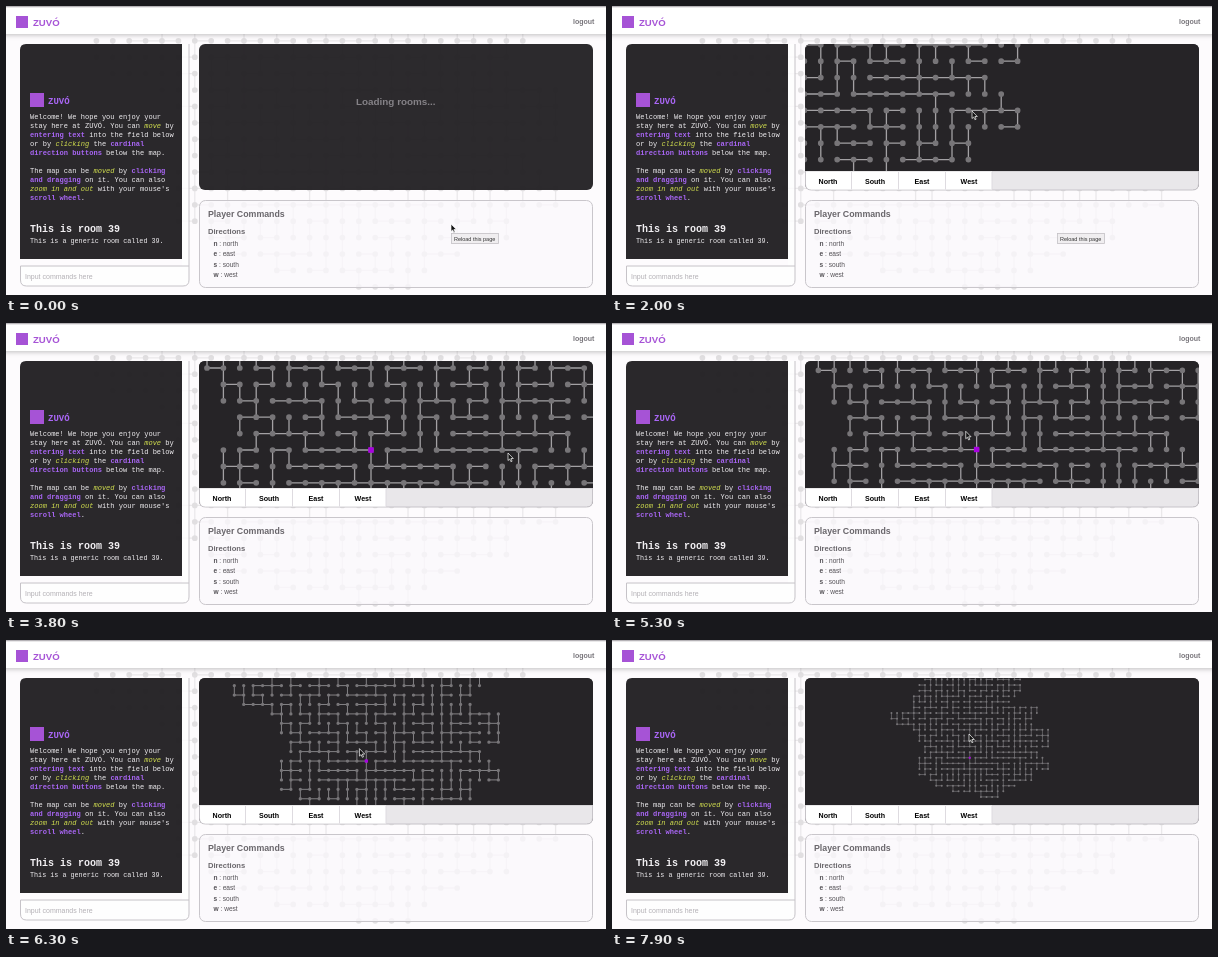
Animation, 600 px wide and 289 px high, one loop 8000 ms. Source, as an HTML page:

```html
<!DOCTYPE html>
<html lang="en">
<head>
<meta charset="utf-8">
<title>Room explorer</title>
<style>
  html, body { margin: 0; width: 100%; height: 100%; overflow: hidden; background: #fdfbfd; }
  svg { display: block; width: 600px; height: 289px; }
  text { font-family: "Liberation Sans", Arial, sans-serif; white-space: pre; }
  .b, b, .k { font-weight: bold; }
  .mono text { font-family: "Liberation Mono", "Courier New", monospace; font-size: 7.05px; fill: #f1eff2; }
  .mono .k { fill: #a966f5; }
  .mono .i { fill: #d3e04f; font-style: italic; }
  .soft { fill: #6a676c; }
</style>
</head>
<body>
<svg viewBox="0 0 600 289">
  <defs>
    <g id="rooms" fill="none">
      <path id="links" stroke="#a3a1a4" stroke-width=".08"/>
      <path id="nodes" stroke="#777578" stroke-width=".35" stroke-linecap="round"/>
    </g>
    <clipPath id="view"><path d="M193 165V44q0-6 6-6h382q6 0 6 6V165z"/></clipPath>
    <filter id="shade" x="-5%" y="-50%" width="110%" height="220%">
      <feDropShadow dx="0" dy="1" stdDeviation="2.5" flood-opacity=".25"/>
    </filter>
  </defs>

  <use href="#rooms" transform="translate(320 166) scale(16.4)" opacity=".2"/>

  <rect x="-10" y="-4" width="620" height="32" fill="#fff" filter="url(#shade)"/>
  <rect width="600" height="1.3" fill="#b5b2b6"/>
  <rect x="10" y="10" width="12" height="12" fill="#a653d6"/>
  <text class="b" x="27" y="20" font-size="9.6" fill="#a653d6">ZUVÓ</text>
  <text class="b" x="567" y="17.5" font-size="7" fill="#77747a">logout</text>

  <path d="M14.5 260V274q0 6 6 6H177q6 0 6-6V38H176V260z" fill="#fff" fill-opacity=".8"/>
  <path d="M183 38V274q0 6-6 6H20.500q-6 0-6-6V260H183" fill="none" stroke="#c6c3c8"/>
  <path d="M14 253V44q0-6 6-6H176V253z" fill="#262427" fill-opacity=".98"/>
  <text x="19" y="272.700" font-size="7" fill="#b3b0b5">Input commands here</text>
  <g class="mono">
    <rect x="24" y="87" width="14" height="14" fill="#a653d6"/>
    <text class="k" x="42" y="97.500" style="font-size:9px">ZUVÓ</text>
    <text x="24" y="113">Welcome! We hope you enjoy your</text>
    <text x="24" y="122">stay here at ZUVÓ. You can <tspan class="i">move</tspan> by</text>
    <text x="24" y="131"><tspan class="k">entering text</tspan> into the field below</text>
    <text x="24" y="140">or by <tspan class="i">clicking</tspan> the <tspan class="k">cardinal</tspan></text>
    <text x="24" y="149"><tspan class="k">direction buttons</tspan> below the map.</text>
    <text x="24" y="167">The map can be <tspan class="i">moved</tspan> by <tspan class="k">clicking</tspan></text>
    <text x="24" y="176"><tspan class="k">and dragging</tspan> on it. You can also</text>
    <text x="24" y="185"><tspan class="i">zoom in and out</tspan> with your mouse's</text>
    <text x="24" y="194"><tspan class="k">scroll wheel</tspan>.</text>
    <text class="b" x="24" y="226" style="font-size:10px">This is room 39</text>
    <text x="24" y="237" style="font-size:6.75px">This is a generic room called 39.</text>
  </g>

  <rect x="193" y="38" width="394" height="146" rx="6" fill="#262427" fill-opacity=".97"/>
  <text id="loading" class="b" x="350" y="99" font-size="9.9" fill="#858287">Loading rooms...</text>
  <g id="world">
    <path d="M193.500 165H586.500V178q0 6-6 6H199.500q-6 0-6-6z" fill="#e9e7ea" stroke="#c6c3c8"/>
    <path d="M194 165.500H380V183.500H199.500q-5.500 0-5.500-5.500z" fill="#fff"/>
    <path d="M239.500 166V183.500M286.500 166V183.500M333.500 166V183.500M380 166V183.500" stroke="#dedbe0"/>
    <g class="b" font-size="7.100" text-anchor="middle">
      <text x="216" y="177.500">North</text>
      <text x="263" y="177.500">South</text>
      <text x="310" y="177.500">East</text>
      <text x="357" y="177.500">West</text>
    </g>
    <g clip-path="url(#view)">
      <rect x="193" y="38" width="394" height="127" fill="#262427"/>
      <g id="map">
        <use href="#rooms"/>
        <rect x="-.17" y="-.17" width=".34" height=".34" fill="#a800e0"/>
      </g>
    </g>
  </g>

  <rect x="193.500" y="194.500" width="393" height="87" rx="6" fill="#fbf9fc" fill-opacity=".75" stroke="#c9c6cb"/>
  <g class="soft b">
    <text x="202" y="211" font-size="8.800">Player Commands</text>
    <text x="202" y="228" font-size="7.600">Directions</text>
  </g>
  <g font-size="6.600" fill="#555257">
    <text x="207.500" y="239.500"><tspan class="b">n</tspan> : north</text>
    <text x="207.500" y="250"><tspan class="b">e</tspan> : east</text>
    <text x="207.500" y="260.500"><tspan class="b">s</tspan> : south</text>
    <text x="207.500" y="271"><tspan class="b">w</tspan> : west</text>
  </g>

  <g id="tip">
    <rect x="445.500" y="227.500" width="47" height="10" fill="#f0eef0" stroke="#c4c1c5" stroke-width=".8"/>
    <text x="448" y="234.500" font-size="5.500" fill="#333">Reload this page</text>
  </g>
  <path id="cursor" d="M0 0V7.500L1.700 6 2.900 8.700 4.100 8.200 2.900 5.500H5.300z" fill="#111" stroke="#fff" stroke-width=".7"/>
</svg>

<script>
const $ = id => document.getElementById(id);

// West and east ends of each row of rooms, from north to south.
const TOP = -16;
const rows = [
  [-5, 7], [-7, 8], [-8, 9], [-9, 9], [-9, 9], [-10, 8], [-10, 7], [-10, 12],
  [-14, 12], [-14, 11], [-13, 11], [-10, 14], [-9, 14], [-9, 14], [-8, 14], [-8, 12],
  [-9, 13], [-9, 14], [-9, 14], [-9, 11], [-7, 11], [-6, 8], [-3, 6], [2, 5]
];

let seed = 39;
const random = () => (seed = seed * 16807 % 2147483647) / 2147483647;

// Grow a random tree of rooms outwards from the start room.
function buildRooms() {
  const seen = new Set(["0,0"]), open = [[0, 0]];
  let links = "", nodes = "M0 0h0";
  const free = ([x, y]) => {
    const row = rows[y - TOP];
    return row && x >= row[0] && x <= row[1] && !seen.has(x + "," + y);
  };
  const join = ([x, y], [u, v]) => {
    seen.add(u + "," + v);
    open.push([u, v]);
    links += `M${x} ${y}L${u} ${v}`;
    nodes += `M${u} ${v}h0`;
  };
  join([0, 0], [0, -1]);
  join([0, 0], [0, 1]);
  while (open.length) {
    const i = random() < .35 ? open.length - 1 : Math.floor(random() * open.length);
    const [x, y] = open[i];
    const next = [[x + 1, y], [x - 1, y], [x, y + 1], [x, y - 1]].filter(free);
    if (next.length) join([x, y], next[Math.floor(random() * next.length)]);
    else open.splice(i, 1);
  }
  $("links").setAttribute("d", links);
  $("nodes").setAttribute("d", nodes);
}

// Each key is [time, ...values]; values between keys are linear.
function track(keys, t) {
  const i = keys.findIndex(key => key[0] > t);
  if (i < 0) return keys[keys.length - 1].slice(1);
  const a = keys[i - 1], b = keys[i], p = (t - a[0]) / (b[0] - a[0]);
  return a.slice(1).map((v, n) => v + (b[n + 1] - v) * p);
}

const CELL = 16.4;
const zoom = (t, k) => [t, 354 + 11 * k, 113 + 14 * k, CELL * k];
const mapKeys = [
  [0, 176, 88, CELL], [2500, 176, 88, CELL], [3200, 278, 107, CELL],
  [3300, 299, 112, CELL], [3800, 365, 127, CELL],
  zoom(4500, 1), zoom(4800, 1.15), zoom(5100, .965), zoom(5300, .965),
  zoom(6100, .73), zoom(6300, .575), zoom(6500, .427), zoom(6800, .427), zoom(7200, .341)
];
const cursorKeys = [
  [0, 445, 218], [100, 442, 210], [900, 360, 105], [2200, 360, 105], [2500, 317, 95],
  [3200, 419, 114], [3300, 440, 118], [3800, 502, 130], [3900, 502, 130],
  [4500, 354, 108], [7600, 353, 109], [7900, 357, 94]
];

function draw(now) {
  const t = Math.floor(now % 8000 / 100) * 100;
  const [x, y, size] = track(mapKeys, t);
  $("map").setAttribute("transform", `translate(${x} ${y}) scale(${size})`);
  $("cursor").setAttribute("transform", `translate(${track(cursorKeys, t)})`);
  $("loading").style.display = t < 1900 ? "" : "none";
  $("world").style.display = t < 1900 ? "none" : "";
  $("tip").style.display = t < 2400 ? "" : "none";
  requestAnimationFrame(draw);
}

buildRooms();
draw(0);
</script>
</body>
</html>
```
